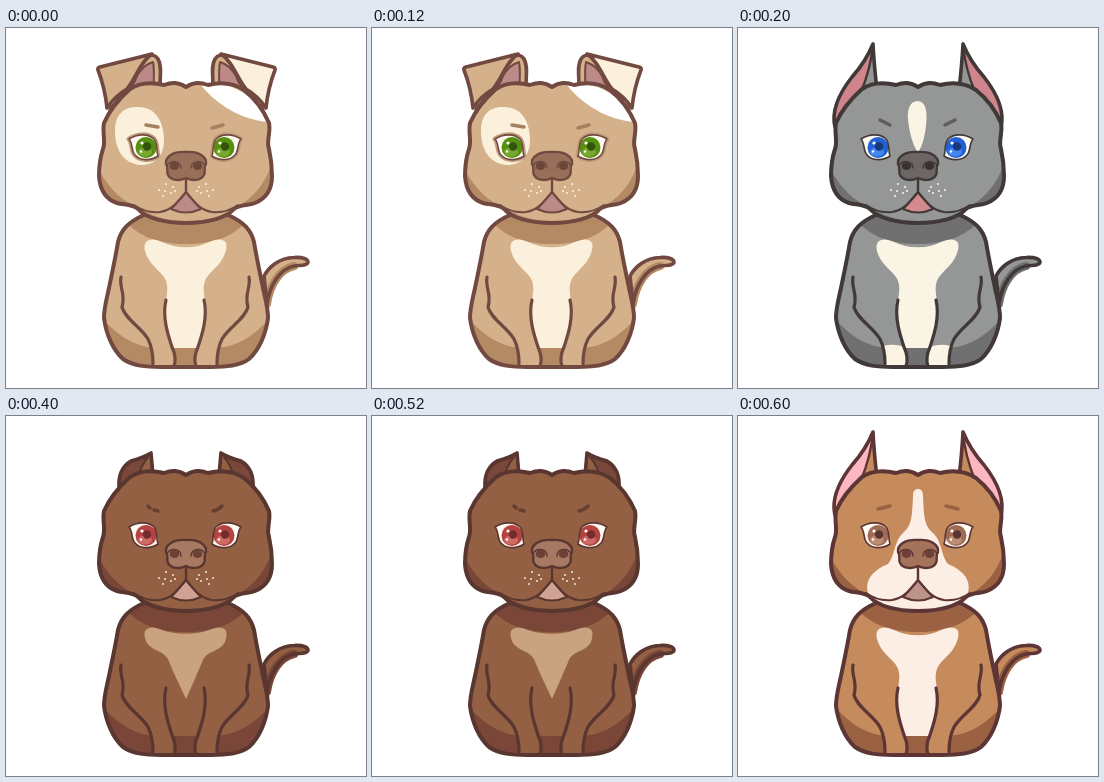
Recreate the animation shown at these times as an HTML page. Size 360 px wide and 360 px high, loop 0.8 s.

```html
<!DOCTYPE html>
<html lang="en">
<head>
<meta charset="utf-8">
<title>Four dogs</title>
<style>
html, body { margin: 0; width: 100%; height: 100%; overflow: hidden; background: #fff; }
svg { display: block; width: 100vw; height: 100vh; stroke-linecap: round; stroke-linejoin: round; }
</style>
</head>
<body>
<svg id="stage" viewBox="0 0 360 360"></svg>
<script>
const path = (d, fill, line, width = 3.6) =>
  `<path d="${d}" fill="${fill || 'none'}"` + (line ? ` stroke="${line}" stroke-width="${width}"` : '') + '/>';
const dot = (x, y, r, fill) => `<circle cx="${x}" cy="${y}" r="${r}" fill="${fill}"/>`;
const mirror = (s, span = 360) => `<g transform="matrix(-1 0 0 1 ${span} 0)">${s}</g>`;
const both = (s, span) => s + mirror(s, span);

const BODY = 'M138 187C122 194 115 202 112 214C109 232 105 250 103 260C100 274 98 280 98 290C100 306 107 322 117 331C127 338 140 339 155 339H205C220 339 234 338 243 331C253 322 260 306 262 290C262 280 260 274 257 260C255 250 251 232 248 214C245 202 238 194 222 187Z';
const HEAD = 'M180 59C172 54 166 54 158 57C146 54 133 55 124 61C114 70 104 81 98 95C96 105 100 113 97 121C94 130 93 138 93 148C94 162 99 171 111 175C118 177 126 176 132 181C140 190 158 195 180 195C202 195 220 190 228 181C234 176 242 178 249 175C261 170 266 160 266 148C266 138 265 130 263 121C260 113 265 105 263 95C257 81 248 70 238 62C227 55 214 54 202 57C194 54 188 54 180 59Z';
const TAIL = 'M258 248C263 239 273 230 288 229.5C297 229 302 231 302 234.5C301 238 294 237 288 238C274 241 264 256 261 276Z';
const CHEST = 'M139 223C136 211 146 209 156 214C170 221 190 221 203 214C214 209 223 211 220 222C217 235 207 241 201 249C197 255 197 262 199 272C202 289 196 307 192 320H166C162 307 156 289 160 272C162 262 162 255 158 249C152 241 142 235 139 223Z';
const BIB = 'M139 222C136 211 146 209 156 214C170 219 190 219 203 214C214 209 223 211 220 222C218 236 202 233 197 244C191 258 185 272 180 283C174 270 167 256 162 243C156 233 142 235 139 222Z';
const EYE = 'M123 111C131 106 142 105 148 111C152 116 150 123 152 128C145 133 134 133 129 127C125 123 127 115 123 111Z';

const ears = {
  pointed: c => both(
    path('M97 99C93 82 103 63 114 49C123 39 130 28 135 16Q136 36 139 62L120 85Z', c.fur) +
    path('M97 99C93 82 103 63 114 49C123 39 130 28 135 16Q133 40 123 64Z', c.ear, c.line, 2.4) +
    path('M97 99C93 82 103 63 114 49C123 39 130 28 135 16Q136 36 139 62', '', c.line)),
  cropped: c => both(
    path('M113 72C112 56 118 49 125 45Q138 41 145 37L147 60Z', c.fur, c.line) +
    path('M114 70C113 56 119 50 126 46Q137 42 142 41Q134 50 132 64Z', c.ear, c.line, 2)),
  folded: c => {
    const ear = flap =>
      path('M102 90L126 45C132 27 147 23 152 31C156 38 154 46 154 59Z', c.fur, c.line) +
      path('M101 92L104 80C115 66 127 62 131 48Q137 37 147 34C149 44 147 53 148 60L120 78Z', c.ear, c.line, 2) +
      path('M92 42Q91 40 94 39Q130 30 146 26C134 34 130 50 121 61Q109 68 101 80Q99 60 92 42Z', flap, c.line);
    return ear(c.fur) + mirror(ear(c.cream), 361);
  }
};

const marks = {
  patch: c =>
    path('M109 103C109 86 118 79 131 79C148 78 158 92 158 112C158 129 148 137 135 137C118 136 109 122 109 103Z', c.cream) +
    path('M195 57C204 69 228 91 262 94C256 74 232 59 213 55Z', '#fff'),
  drop: c => path('M179.5 73C172 73 169 82 170 91C171 104 175 117 180 125C185 117 188 104 188.500 91C189 82 187 73 179.500 73Z', c.cream),
  none: () => '',
  blaze: c => path('M180 73C177 73 175 75 175 80C174 105 173 110 164 118C156 126 157 140 150 148C138 153 126 162 130 177C139 190 160 195 180 195C200 195 221 190 230 177C234 162 222 153 210 148C203 140 204 126 196 118C187 110 186 105 185 80C185 75 183 73 180 73Z', c.cream)
};

const iris = (x, c) =>
  dot(x, 119.5, 10.5, c.iris) +
  `<ellipse cx="${x - 1}" cy="124" rx="7" ry="4.5" fill="${c.glow}"/>` +
  dot(x + 1, 118.5, 4.2, c.pupil) + dot(x - 4, 115, 1.6, '#fff') + dot(x - 5, 123.5, 1.2, '#fff');

function whiskers(color) {
  let s = '';
  for (const [x, y] of [[160, 156], [153, 162], [159, 163], [167, 159], [165, 165], [157, 168], [169, 163]])
    s += dot(x, y, 1, color);
  return both(s);
}

function eyes(c) {
  return (c.socket ? both(path(EYE, c.socket, c.socket, 5), 358) : '') +
    both(path(EYE, '#fffaf2'), 358) + iris(140, c) + iris(218, c) +
    both(path(EYE, '', c.line, 1.6), 358);
}

function muzzle(c) {
  const nostril = `<ellipse cx="168.500" cy="138" rx="4.800" ry="4" fill="${c.nostril}"/>`;
  return path('M180 164C174 171 169 177 165 181Q180 188 195 181C191 177 186 171 180 164Z', c.tongue, c.line, 2) +
    both(path('M180 164C172 174 166 182 154 184C144 185 135 182 128 177', '', c.line, 2)) +
    path('M180 150V164', '', c.line, 2.4) +
    path('M180 124C167 123 159 129 160 136C163 140 160 143 162 147C165 153 175 153 180 150C185 153 195 153 198 147C200 143 197 140 200 136C201 129 193 123 180 124Z', c.nose, c.line, 2.4) +
    both(nostril + path('M161 137C166 131 175 133 175 140', '', c.line, 1.5)) +
    (c.dots ? whiskers(c.dots) : '');
}

function head(c, i) {
  const cheeks = path('M90 136C100 158 116 174 134 181C150 190 165 193 180 193C200 193 216 189 228 180C246 172 260 156 268 130V200H90Z', c.shade);
  return path(HEAD, c.fur) +
    `<g clip-path="url(#head${i})">${cheeks}${marks[c.mark](c)}</g>` +
    eyes(c) + path(c.brows, '', c.brow, 3.5) + muzzle(c) + path(HEAD, '', c.line, 4);
}

function body(c, i) {
  const outer = 'M115 249C113 260 120 266 116 279C119 291 135 299 142 311Q147 321 147 336';
  const inner = 'M160 272C156 289 162 307 166 319Q171 330 168 338';
  const foot = path('M135 300L160 300Q162 310 166 319Q171 330 168 340H147Q147 321 142 311Z', c.fur);
  const paw = path('M147 340Q147 326 145 318Q156 315 166 319Q171 330 168 340Z', c.cream);
  return path(BODY, c.fur) +
    `<g clip-path="url(#body${i})">` +
    path('M95 289C108 304 126 319 150 320H210C234 319 252 304 265 289V345H95Z', c.shade) +
    path('M116 190C132 209 153 216 180 216C207 216 228 209 244 190L180 170Z', c.shade) +
    both(foot, 358) + path(c.bib ? BIB : CHEST, c.cream) +
    (c.paws ? both(paw, 358) : '') + '</g>' +
    both(path(outer, '', c.line, 3.2) + path(inner, '', c.line, 3.2), 358) +
    path(BODY, '', c.line, 4);
}

function tail(c) {
  return path(TAIL, c.fur) +
    path('M261 276C264 256 274 241 288 238', '', c.shade, 8) +
    path(TAIL, '', c.line);
}

const dog = (c, i) => '<g visibility="hidden">' +
  `<clipPath id="body${i}"><path d="${BODY}"/></clipPath><clipPath id="head${i}"><path d="${HEAD}"/></clipPath>` +
  tail(c) + body(c, i) + ears[c.ears](c) + head(c, i) + '</g>';

const dogs = [
  { ears: 'folded', mark: 'patch', fur: '#d4b18b', shade: '#b48a65', line: '#714940', cream: '#faf0dc',
    ear: '#bb8a89', tongue: '#bb8a89', nose: '#98705a', nostril: '#6d463b',
    iris: '#55900f', glow: '#79a832', pupil: '#34540d', brow: '#a77f61', socket: '#c19c7b', dots: '#fff3dc',
    brows: 'M140 97L152 99M206 100L217 97' },
  { ears: 'pointed', mark: 'drop', paws: true, fur: '#959696', shade: '#707070', line: '#403938', cream: '#faf4e4',
    ear: '#cf858b', tongue: '#d28a8d', nose: '#6c6765', nostril: '#393231',
    iris: '#2260d3', glow: '#4386ed', pupil: '#173879', brow: '#625d5d', dots: '#fff6e8',
    brows: 'M142 92L152 97M207 97L217 92' },
  { ears: 'cropped', mark: 'none', bib: true, fur: '#936044', shade: '#7a4638', line: '#593630', cream: '#c9a27f',
    ear: '#79483a', tongue: '#cfa293', nose: '#a77962', nostril: '#6c4238',
    iris: '#b54140', glow: '#cf6a64', pupil: '#722d2c', brow: '#65402f', dots: '#f6e4cb',
    brows: 'M142 90L144 92M148 94L152 95M207 95Q212 94 216 90' },
  { ears: 'pointed', mark: 'blaze', fur: '#c58b5d', shade: '#9a6242', line: '#5d3534', cream: '#fdeee5',
    ear: '#fdb7c3', tongue: '#bd948a', nose: '#a5735a', nostril: '#6a4038',
    iris: '#a06b55', glow: '#bd8b76', pupil: '#5b3530', brow: '#9a6242',
    brows: 'M140 93L152 90M208 90L220 93' }
];

const stage = document.getElementById('stage');
stage.innerHTML = dogs.map(dog).join('');
const start = performance.now();

function draw() {
  const now = Math.floor(Math.max(0, performance.now() - start) / 200) % dogs.length;
  [...stage.children].forEach((g, i) => g.setAttribute('visibility', i === now ? 'visible' : 'hidden'));
  requestAnimationFrame(draw);
}
draw();
</script>
</body>
</html>
```
